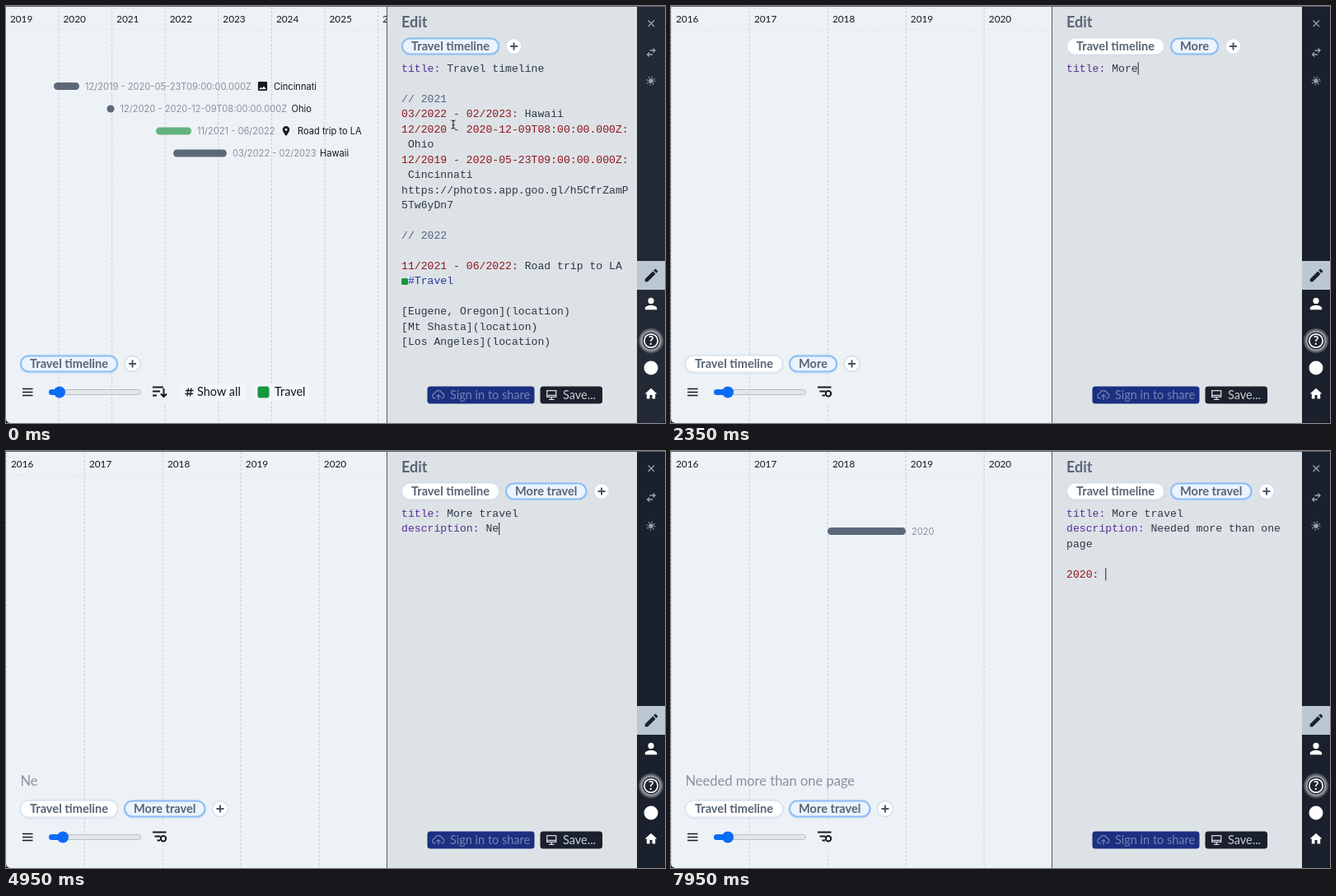
An HTML page that plays this animation: 800 by 507 pixels, repeating every 8 s.

```html
<!DOCTYPE html>
<html lang="en">
<head>
<meta charset="utf-8">
<title>Timeline editor</title>
<style>
html, body { margin: 0; width: 100%; height: 100%; overflow: hidden; }
svg { display: block; width: 100%; height: 100%; }
text { white-space: pre; font: 14.5px Lato, sans-serif; }
.tab { font-weight: 700; font-size: 14.6px; fill: #596474; }
.year { font-size: 11.8px; fill: #14181f; }
.label { font: 11.1px Inter, sans-serif; }
.code { font: 13.13px "Liberation Mono", monospace; fill: #2d3748; }
</style>
</head>
<body>
<svg viewBox="0 0 800 507" preserveAspectRatio="none">
  <defs>
    <radialGradient id="glow">
      <stop offset=".6" stop-color="#fff" stop-opacity=".75"/>
      <stop offset="1" stop-color="#fff" stop-opacity="0"/>
    </radialGradient>
  </defs>
  <rect width="800" height="507" fill="#edf2f7"/>
  <path d="M0 29.5H462" stroke="#dfe4ea" stroke-dasharray="2 2"/>
  <g id="chart"></g>

  <!-- editor panel -->
  <rect x="462" width="304" height="507" fill="#dde2e6"/>
  <path d="M462.5 0V507" stroke="#4f5a6b"/>
  <text x="480" y="25.5" style="font-size:18px;font-weight:700" fill="#5a6576">Edit</text>
  <rect x="511.5" y="462.5" width="130" height="21" rx="3.5" fill="#1c2f80"/>
  <rect x="648.5" y="462.5" width="75.5" height="21" rx="3.5" fill="#1a202c"/>
  <text x="539" y="478" fill="#7683b7">Sign in to share</text>
  <text x="676" y="478" fill="#ccd0d6">Save...</text>
  <path d="M522 477h-1a3 3 0 0 1-.3-6a4.500 4.500 0 0 1 8.600-.3a3.200 3.200 0 0 1-.3 6.300h-1M525 479v-6m-2.500 2.200l2.500-2.500l2.500 2.500" fill="none" stroke="#7683b7" stroke-width="1.2"/>
  <path d="M656.700 467.700h11v7.600h-11zM659 478.300h6.500M662.200 475v3M657 473.300h10.500" fill="none" stroke="#d5d8dd" stroke-width="1.3"/>

  <!-- side bar -->
  <rect id="side" x="766" width="34" height="507"/>
  <g fill="none" stroke="#9aa1ab" stroke-width="1.3">
    <path d="M779.500 17.500l7.500 7.500m0-7.500l-7.500 7.500"/>
    <path d="M781.500 54h6m-2-2.500l2.500 2.500l-2.500 2.500M785 59h-6m2-2.500l-2.500 2.500l2.500 2.500"/>
    <circle cx="783" cy="91" r="2.2" fill="#9aa1ab"/>
    <circle cx="783" cy="91" r="4.6" stroke-width="1.8" stroke-dasharray="1.2 2.413"/>
  </g>
  <rect x="766" y="310" width="34" height="35" fill="#bcc7d4"/>
  <g id="icons"></g>
  <circle cx="783" cy="407" r="16" fill="url(#glow)"/>
  <circle cx="783" cy="407" r="10.5" fill="#1f2530"/>
  <circle cx="783" cy="407" r="8.2" fill="none" stroke="#fff" stroke-width="1.7"/>
  <text x="783" y="412" text-anchor="middle" fill="#fff" style="font-weight:700">?</text>
  <circle cx="783" cy="440" r="8.5" fill="#fff"/>

  <g id="live"></g>
  <path d="M0 .5H800" stroke="#596069"/>
  <path d="M0 502a5 5 0 0 0 5 5H0zM800 502a5 5 0 0 1-5 5h5z" fill="#111"/>
</svg>
<script>
const $ = id => document.getElementById(id);
const CHAR = 7.88, ROW = 18.45, LEFT = 480, SWITCH = 1050, CLICK = 1550;
const measure = document.createElement("canvas").getContext("2d");

const text = (x, y, s, cls = "", fill = "") =>
  `<text x="${x}" y="${y}" class="${cls}"${fill && ` fill="${fill}"`}>${s}</text>`;
const box = (x, y, w, h, r, fill, more = "") =>
  `<rect x="${x}" y="${y}" width="${w}" height="${h}" rx="${r}" fill="${fill}" ${more}/>`;
const line = (d, color, width) =>
  `<path d="${d}" fill="none" stroke="${color}" stroke-width="${width}"/>`;
const icon = (d, x, y, scale, fill) =>
  `<path d="${d}" transform="translate(${x} ${y}) scale(${scale}) translate(-12 -12)" fill="${fill}" fill-rule="evenodd"/>`;

const PENCIL = "M3 17.250V21h3.750L17.810 9.940l-3.750-3.750zM20.710 7.040c.39-.39.39-1.020 0-1.410l-2.340-2.340c-.39-.39-1.020-.39-1.410 0l-1.830 1.830 3.750 3.750z";
const PERSON = "M12 12a4 4 0 1 0 0-8a4 4 0 0 0 0 8zm0 2c-2.670 0-8 1.340-8 4v2h16v-2c0-2.660-5.330-4-8-4z";
const HOME = "M10 20v-6h4v6h5v-8h3L12 3 2 12h3v8z";
const IMAGE = "M21 19V5a2 2 0 0 0-2-2H5a2 2 0 0 0-2 2v14a2 2 0 0 0 2 2h14a2 2 0 0 0 2-2zM8.500 13.500l2.500 3L14.500 12l4.500 6H5z";
const PIN = "M12 2a7 7 0 0 0-7 7c0 5.250 7 13 7 13s7-7.750 7-13a7 7 0 0 0-7-7zm0 9.500a2.500 2.500 0 1 1 0-5a2.500 2.500 0 0 1 0 5z";

$("icons").innerHTML = icon(PENCIL, 783.5, 327.5, .86, "#1a202c") +
  icon(PERSON, 783, 362, .9, "#fff") + icon(HOME, 783, 471.5, .74, "#fff");

const travelLines = `title: Travel timeline

// 2021
03/2022 - 02/2023: Hawaii
12/2020 - 2020-12-09T08:00:00.000Z:
 Ohio
12/2019 - 2020-05-23T09:00:00.000Z:
 Cincinnati
https://photos.app.goo.gl/h5CfrZamP
5Tw6yDn7

// 2022

11/2021 - 06/2022: Road trip to LA
 #Travel

[Eugene, Oregon](location)
[Mt Shasta](location)
[Los Angeles](location)`.split("\n");

// [first key time, time per key, keys]
const typing = [
  [1700, 50, "\b".repeat(6)], [2100, 80, "More"], [2400, 60, " travel"],
  [2850, 75, "\ndescripti"], [3700, 150, "on: "], [4450, 200, "Ne"],
  [5390, 50, "eded more than"], [6095, 25, " on"], [6250, 100, "e page"],
  [6850, 100, "\n\n"], [7245, 50, "202"], [7550, 180, "0: "]
];

function typed(t) {
  let s = "title: Page 2";
  for (const [start, step, keys] of typing)
    [...keys].forEach((key, i) => {
      if (t >= start + i * step) s = key === "\b" ? s.slice(0, -1) : s + key;
    });
  return s;
}

const wrap = s => s.split("\n").flatMap(l => l.match(/.{1,35}(?:\s|$)/g) || [""]);

function codeLine(s, row) {
  const tint = color => m => `<tspan fill="${color}">${m}</tspan>`;
  const html = s.replace(/^\/\/.*/, tint("#566285"))
    .replace(/^(title|description):/, tint("#553096"))
    .replace(/^[\d\/.:TZ -]+:/, tint("#8f1822"))
    .replace(/^ #.*/, tint("#26399c"));
  const mark = s.startsWith(" #") ? box(LEFT, 331, 8, 8, 1.5, "#16963f") : "";
  return mark + text(LEFT, 80 + row * ROW, html, "code");
}

function tabs(x, y, names) {
  measure.font = "700 14.6px Lato, sans-serif";
  let out = "";
  names.forEach((name, i) => {
    const on = i === names.length - 1, w = measure.measureText(name).width + 23;
    out += box(x - .5, y - 10.5, w + 1, 22, 11, "none", 'stroke="#cfdcec" stroke-width="1.5" stroke-opacity=".7"') +
      box(x + .5, y - 9.5, w - 1, 19, 9.5, on ? "#eaf3fe" : "#fff",
        `stroke="${on ? "#8abdf4" : "#e8eff8"}" stroke-width="${on ? 2 : 1}"`) +
      text(x + 11.5, y + 4.8, name, "tab");
    x += w + 8;
  });
  const cx = x + 10;
  return out + `<circle cx="${cx}" cy="${y}" r="9.5" fill="#fff" stroke="#d3dfee" stroke-width="1.5"/>` +
    line(`M${cx - 4.5} ${y}h9m-4.500-4.500v9`, "#4a5568", 2);
}

function grid(x0, step, first, dx) {
  let out = "";
  for (let i = 0; x0 + i * step < 462; i++) {
    const x = x0 + i * step;
    out += `<path d="M${x} 1V507" stroke="#c9ced4" stroke-dasharray="3 2"/>` +
      text(x + dx, 20, first + i, "year");
  }
  return out;
}

function event(x, end, y, date, name = "", nameX = 0, color = "#5c6878") {
  return box(x, y - 4.5, end - x, 9, 4.5, color) + text(end + 7, y + 4, date, "label", "#8a919b") +
    text(nameX, y + 4, name, "label", "#14181f");
}

function toolbar(thumb, first) {
  const sort = first
    ? "M178 463.500h13M178 468.500h9M178 473.500h5M191.500 465v10m-3.500-3.500l3.500 3.500l3.500-3.500"
    : "M178 463.500h16.500M180.500 468.500h7M183.500 473.500h3.500M194.200 471.200a3.200 3.200 0 1 1-6.400 0a3.200 3.200 0 1 1 6.400 0";
  return box(172, 453, 27, 33, 4, "#edf2f7") +
    line("M20 465.500h12.500m-12.500 4h12.500m-12.500 4h12.500", "#14181f", 1.6) +
    box(52.5, 466.5, 111, 6, 3, "#e3e6ea", 'stroke="#b9bec4"') +
    box(52, 466, thumb - 52, 7, 3.5, "#0a6cf5") +
    `<circle cx="${thumb}" cy="469.5" r="7" fill="#0a6cf5"/>` + line(sort, "#14181f", 2);
}

function firstPage() {
  return grid(-.6, 64.6, 2019, 5.5) +
    event(58, 89, 97.5, "12/2019 - 2020-05-23T09:00:00.000Z", "Cincinnati", 325) +
    icon(IMAGE, 311.5, 97.5, .62, "#14181f") +
    event(122.5, 131.5, 125, "12/2020 - 2020-12-09T08:00:00.000Z", "Ohio", 346.5) +
    event(182, 225, 152, "11/2021 - 06/2022", "Road trip to LA", 354, "#62b27e") +
    icon(PIN, 340, 152, .6, "#14181f") +
    event(203, 268, 179, "03/2022 - 02/2023", "Hawaii", 381) +
    toolbar(65, true) +
    box(210, 459, 81, 21, 4, "#f2f5f9") +
    line("M221.500 464.500l-1.500 10m5-10l-1.500 10M218 467.500h9.500m-10 4h9.500", "#14181f", 1.3) +
    text(232, 474, "Show all", "", "#14181f") +
    box(299, 459, 69, 21, 4, "#f2f5f9") + box(305.5, 462.5, 14, 14, 3, "#16963f") +
    text(326, 474, "Travel", "", "#14181f");
}

function secondPage(code) {
  const about = /description: (.+)/.exec(code);
  return grid(.3, 94.95, 2016, 5.7) +
    (code.includes("2020:") ? event(190, 285, 97.5, "2020") : "") +
    (about ? `<text x="17.5" y="407" fill="#8a91a0" style="font-size:16.5px">${about[1]}</text>` : "") +
    toolbar(69, false);
}

// [time, x, y]
const path = [[0, 543, 144], [300, 543, 144], [850, 157, 436], [1000, 157, 436], [1200, 557.5, 143.5], [CLICK, 592, 78]];

function pointer(t) {
  if (t >= 1700) return "";
  const i = path.findLastIndex(p => p[0] <= t);
  const a = path[i], b = path[i + 1] || [a[0] + 1, a[1], a[2]];
  const u = Math.min(1, (t - a[0]) / (b[0] - a[0])), k = u * u * (3 - 2 * u);
  const x = a[1] + (b[1] - a[1]) * k, y = a[2] + (b[2] - a[2]) * k;
  let shape;
  if (x > 463)
    shape = line("M-2.500-5q2 0 2.500 1q.5-1 2.500-1M0-4v8M-2.500 5q2 0 2.500-1q.5 1 2.500 1M-1.500 .8h3", "#222", 1.1);
  else if (Math.hypot(x - 155, y - 435) < 11)
    shape = `<path d="M1 1q1.600-1.200 2.300.5l1.200 3q1-.8 1.700.2q1.100-.7 1.700.3q1.500-.5 1.500 1.200l-.2 3.300l-1 2.200h-4.200l-3.700-3.700q-.3-1.500 1.500-1l.7.4z" fill="#fff" stroke="#222"/>`;
  else
    shape = `<path d="M0 0v11.500l2.700-2.500l1.800 4.200l1.800-.8l-1.800-4.100h3.700z" fill="#111" stroke="#fff" stroke-width=".8"/>`;
  return `<g transform="translate(${x} ${y})">${shape}</g>`;
}

function draw(now) {
  const t = now % 8000, first = t < SWITCH, code = typed(t);
  const lines = first ? travelLines : wrap(code);
  const names = ["Travel timeline"];
  if (!first) names.push(/title: ?(.*)/.exec(code)[1] || "Page 2");

  $("side").setAttribute("fill", first ? "#242a35" : "#1a202c");
  $("chart").innerHTML = (first ? firstPage() : secondPage(code)) + tabs(17.5, 435, names);

  let live = tabs(480.5, 49, names) + lines.map(codeLine).join("");
  if (!first) {
    const ready = t >= CLICK, row = ready ? lines.length - 1 : 0;
    live += box(LEFT + (ready ? lines[row].length * CHAR : 0), 68.5 + row * ROW, 1, 15, 0, "#1a202c");
  }
  $("live").innerHTML = live + pointer(t);
  requestAnimationFrame(draw);
}
requestAnimationFrame(draw);
</script>
</body>
</html>
```
